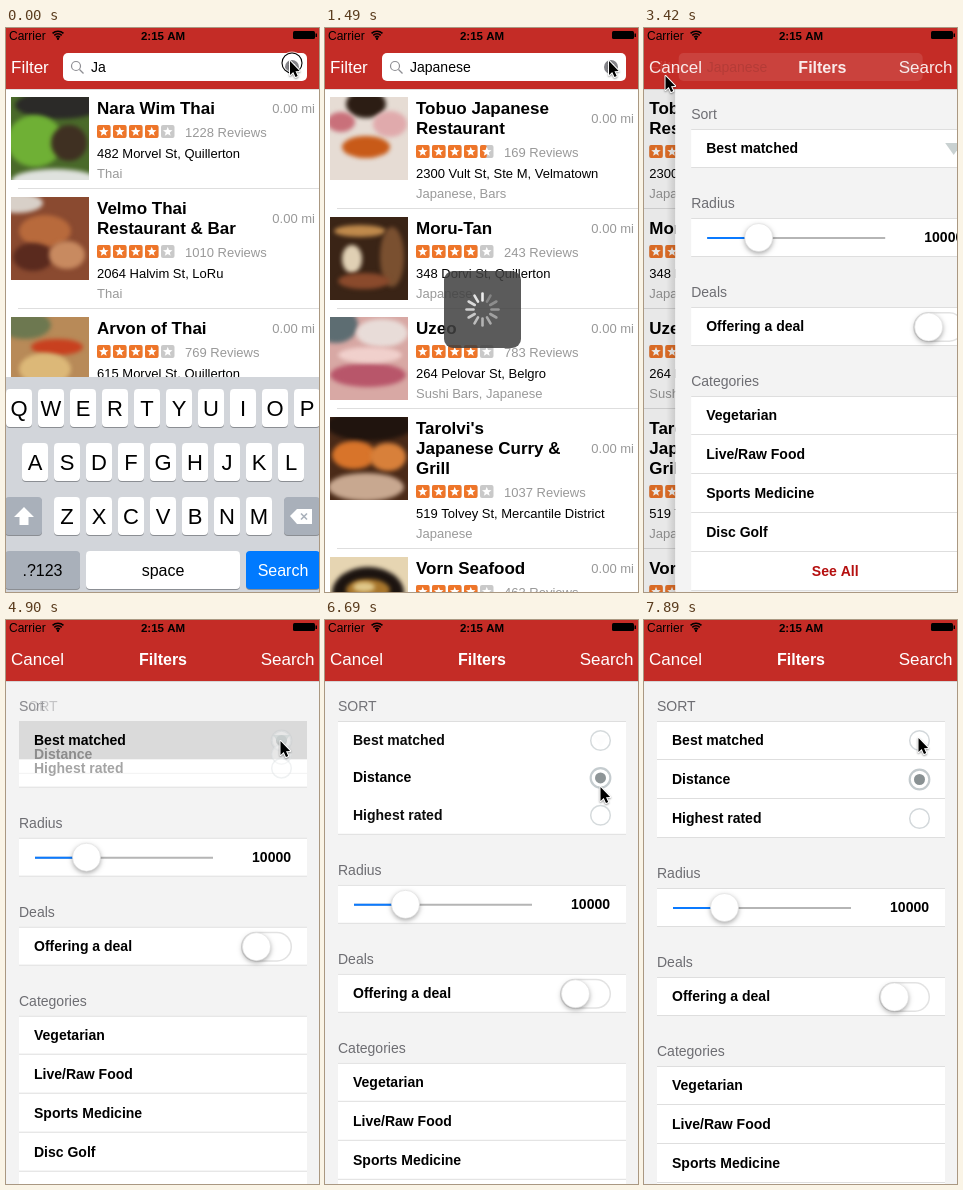
An HTML page with a canvas for the animation above (8000 ms loop, 313 by 564 pixels).

```html
<!DOCTYPE html>
<html lang="en">
<head>
<meta charset="utf-8">
<title>Search and filters</title>
<style>
html, body { margin: 0; width: 100%; height: 100%; overflow: hidden; background: #fff; }
canvas { display: block; }
</style>
</head>
<body>
<canvas id="stage" width="313" height="564"></canvas>
<script>
const ctx = document.getElementById('stage').getContext('2d');
const W = 313, H = 564, LOOP = 8000, STEP = 148.9;
const RED = '#c42c26', GREY = '#999', LINE = '#dedede', PANEL = '#f3f3f3';

const clamp = v => Math.max(0, Math.min(1, v));
const smooth = v => { v = clamp(v); return v * v * (3 - 2 * v); };

function text(str, x, midY, size, color = '#000', weight = '', align = 'left') {
  ctx.font = `${weight} ${size}px "Liberation Sans", Arial, sans-serif`;
  ctx.textAlign = align;
  ctx.fillStyle = color;
  ctx.fillText(str, x, Math.round(midY + size * 0.36));
}
function rect(x, y, w, h, color, r = 0) {
  ctx.fillStyle = color;
  ctx.beginPath();
  ctx.roundRect(x, y, w, h, r);
  ctx.fill();
}
function disc(x, y, rx, color, ry = rx) {
  ctx.fillStyle = color;
  ctx.beginPath();
  ctx.ellipse(x, y, rx, ry, 0, 0, 7);
  ctx.fill();
}
function ring(x, y, r, color, width) {
  ctx.strokeStyle = color;
  ctx.lineWidth = width;
  ctx.beginPath();
  ctx.arc(x, y, r, 0, 7);
  ctx.stroke();
}
function poly(points, color) {
  ctx.fillStyle = color;
  ctx.beginPath();
  points.forEach(p => ctx.lineTo(...p));
  ctx.closePath();
  ctx.fill();
}
function line(x1, y1, x2, y2, color, width = 1) {
  ctx.strokeStyle = color;
  ctx.lineWidth = width;
  ctx.beginPath();
  ctx.moveTo(x1, y1);
  ctx.lineTo(x2, y2);
  ctx.stroke();
}
function faded(alpha, draw, dx = 0, dy = 0) {
  if (alpha <= 0) return;
  ctx.save();
  ctx.globalAlpha *= alpha;
  ctx.translate(dx, dy);
  draw();
  ctx.restore();
}
function shadowed(blur, dy, draw) {
  ctx.save();
  ctx.shadowColor = 'rgba(0,0,0,.35)';
  ctx.shadowBlur = blur;
  ctx.shadowOffsetY = dy;
  draw();
  ctx.restore();
}

// Each photo: background, then soft ellipses [color, x, y, rx, ry].
const photos = {
  salad: ['#4a6a2a', ['#2b2a28', 48, 8, 44, 14], ['#6fb035', 24, 44, 28, 26], ['#3f3022', 58, 46, 18, 18], ['#dfe2de', 44, 84, 44, 12]],
  stirFry: ['#8a4a30', ['#d8d0c8', 6, 6, 26, 10], ['#b86a3c', 34, 34, 26, 16], ['#5a2a1e', 22, 60, 20, 14], ['#c88a60', 56, 58, 18, 14]],
  noodles: ['#b88a58', ['#6d7850', 14, 8, 26, 14], ['#c8401f', 46, 30, 26, 8], ['#dcb878', 34, 52, 26, 16], ['#e2d8c8', 8, 78, 26, 10]],
  sashimi: ['#e6dcd4', ['#2c1d14', 36, 7, 20, 14], ['#c9707a', 11, 25, 14, 10], ['#e0aaac', 60, 27, 17, 13], ['#c85a18', 36, 50, 24, 11]],
  interior: ['#3a2416', ['#c08a4c', 30, 14, 26, 6], ['#e0d0b4', 22, 42, 10, 14], ['#7a5030', 62, 40, 12, 30], ['#8a4a2c', 34, 64, 26, 8]],
  tuna: ['#d8a8a4', ['#5d6d72', 6, 8, 22, 18], ['#e8dcd8', 52, 16, 26, 14], ['#b8566a', 38, 58, 38, 12], ['#f0d0cc', 40, 38, 32, 8]],
  rolls: ['#4a2a18', ['#20140e', 40, 8, 44, 16], ['#d8742a', 24, 38, 22, 14], ['#d8803a', 58, 40, 18, 14], ['#c8a890', 36, 70, 38, 14]],
  bowl: ['#e6d5b2', ['#1c1410', 38, 36, 36, 26], ['#a8762c', 38, 33, 22, 11], ['#e0c88a', 34, 30, 11, 5]]
};

// [title lines, stars, reviews, address, category, photo]
const thaiPlaces = [
  [['Nara Wim Thai'], 4, 1228, '482 Morvel St, Quillerton', 'Thai', 'salad'],
  [['Velmo Thai', 'Restaurant & Bar'], 4, 1010, '2064 Halvim St, LoRu', 'Thai', 'stirFry'],
  [['Arvon of Thai'], 4, 769, '615 Morvel St, Quillerton', 'Thai', 'noodles'],
  [['Sovu Thai Kitchen'], 4, 541, '823 Dorvi St, Quillerton', 'Thai', 'stirFry'],
  [['Pimlao Noodle'], 4, 388, '276 Tolvey St, LoRu', 'Thai', 'noodles']
];
const japanesePlaces = [
  [['Tobuo Japanese', 'Restaurant'], 4.5, 169, '2300 Vult St, Ste M, Velmatown', 'Japanese, Bars', 'sashimi'],
  [['Moru-Tan'], 4, 243, '348 Dorvi St, Quillerton', 'Japanese', 'interior'],
  [['Uzeo'], 4, 783, '264 Pelovar St, Belgro', 'Sushi Bars, Japanese', 'tuna'],
  [["Tarolvi's", 'Japanese Curry &', 'Grill'], 4, 1037, '519 Tolvey St, Mercantile District', 'Japanese', 'rolls'],
  [['Vorn Seafood'], 4, 463, '731 Halvim St, Velmatown', 'Japanese', 'bowl']
];

function photo(name, x, y) {
  const [base, ...blobs] = photos[name];
  ctx.save();
  ctx.beginPath();
  ctx.rect(x, y, 78, 83);
  ctx.clip();
  ctx.translate(x, y);
  rect(0, 0, 78, 83, base);
  ctx.filter = 'blur(2px)';
  for (const [color, cx, cy, rx, ry] of blobs) disc(cx, cy, rx, color, ry);
  ctx.restore();
}

function stars(count, x, midY) {
  for (let i = 0; i < 5; i++) {
    const left = x + i * 16, share = clamp(count - i);
    rect(left, midY - 6.5, 13.5, 13, '#c9c9c9', 2);
    if (share) rect(left, midY - 6.5, 13.5 * share, 13, '#ee7529', 2);
    poly(Array.from({ length: 10 }, (_, n) => {
      const r = n % 2 ? 2.1 : 5, a = n * Math.PI / 5;
      return [left + 6.75 + r * Math.sin(a), midY + 0.3 - r * Math.cos(a)];
    }), '#fff');
  }
}

function list(places) {
  rect(-3, 61, 325, H, '#fff');
  let top = 61;
  for (const [title, rating, reviews, address, category, picture] of places) {
    const n = title.length, y = top + 20 * n;
    photo(picture, 5, top + 8);
    title.forEach((s, i) => text(s, 91, top + 19 + 20 * i, 17, '#000', 'bold'));
    text('0.00 mi', 309, top + 9 + 10 * n, 13, GREY, '', 'right');
    stars(rating, 91, y + 22.5);
    text(reviews + ' Reviews', 179, y + 23.5, 13, GREY);
    text(address, 91, y + 44, 13);
    text(category, 91, y + 64, 13, GREY);
    top = y + 80;
    line(12, top - 0.5, 320, top - 0.5, LINE);
  }
}

function keyboard() {
  rect(0, 349, W, 220, '#d2d5da');
  const key = (x, y, w, color, label, size, ink = '#000') => {
    rect(x, y + 1, w, 38, '#8b8e93', 4);
    rect(x, y, w, 38, color, 4);
    text(label, x + w / 2, y + 19, size, ink, '', 'center');
  };
  [['QWERTYUIOP', 0], ['ASDFGHJKL', 16], ['ZXCVBNM', 48]].forEach(([letters, x], row) =>
    [...letters].forEach((c, i) => key(x + 32 * i, 361 + 54 * row, 26, '#fff', c, 22)));
  key(-1, 469, 37, '#a9b0ba', '', 16);
  poly([[18, 479], [28, 489], [22.5, 489], [22.5, 497], [13.5, 497], [13.5, 489], [8, 489]], '#fff');
  key(278, 469, 36, '#a9b0ba', '', 16);
  poly([[284, 488], [291, 481], [306, 481], [306, 496], [291, 496]], '#fff');
  cross(298, 488.5, 3, '#a9b0ba');
  key(-1, 523, 75, '#a9b0ba', '.?123', 16);
  key(80, 523, 154, '#fff', 'space', 16);
  key(240, 523, 74, '#007aff', 'Search', 16, '#fff');
}

function cross(x, y, r, color) {
  line(x - r, y - r, x + r, y + r, color, 1.6);
  line(x - r, y + r, x + r, y - r, color, 1.6);
}

function searchField(query) {
  rect(57, 25, 244, 28, '#fff', 5);
  ring(70, 38, 4.5, '#8e8e93', 1.2);
  line(73.5, 41.5, 77.5, 45.5, '#8e8e93', 1.3);
  text(query, 85, 39, 14);
  disc(286, 39, 7, '#85858a');
  cross(286, 39, 2.8, '#fff');
}

function navBar(query, push, pressed) {
  rect(0, 0, W, 61, RED);
  text('Carrier', 3, 7.5, 12);
  for (const r of [3, 5.6, 8.2]) {
    ctx.strokeStyle = '#000';
    ctx.lineWidth = 1.6;
    ctx.beginPath();
    ctx.arc(52, 11.5, r, -2.3, -0.84);
    ctx.stroke();
  }
  disc(52, 10.7, 1.2, '#000');
  text('2:15 AM', 157, 7.5, 11.5, '#000', 'bold', 'center');
  rect(287, 3, 22, 8, '#000', 1.5);
  rect(309.5, 5.5, 1.5, 3.5, '#000');

  faded(1 - push, () => searchField(query), -25 * push);
  faded(pressed ? 0.25 : 1 - push, () => text('Filter', 5, 39, 17, '#fff'));
  faded(push, () => {
    text('Cancel', 5, 39, 17, '#fff');
    text('Search', 308.5, 39, 17, '#fff', '', 'right');
    text('Filters', 157 + 200 * (1 - push), 39, 16, '#fff', 'bold', 'center');
  });
}

function box(top, height) {
  rect(13, top, 288, height, '#fff');
  line(13, top + 0.5, 301, top + 0.5, LINE);
  line(13, top + height - 0.5, 301, top + height - 0.5, LINE);
}
const label = (str, y) => text(str, 28, y, 14, '#000', 'bold');
const heading = (str, y) => text(str, 13, y, 14, '#6d6d72');

function radio(y, on) {
  disc(275.5, y, 10, '#fff');
  ring(275.5, y, 9.8, on ? '#c3cacd' : '#d3d8db', on ? 2.2 : 1.5);
  if (on) disc(275.5, y, 5.5, '#899193');
}
function knob(x, y) {
  shadowed(5, 2, () => disc(x, y, 14, '#fff'));
  ring(x, y, 14, '#dedede', 0.6);
}

function filters({ open, collapsing, selected, highlight }) {
  rect(-3, 61, 325, H, PANEL);
  faded(1 - open, () => heading('Sort', 86));
  faded(open, () => heading('SORT', 86));
  box(101, 39 + 78 * open);
  const rowTop = i => 101 + 39 * i * open;
  if (highlight) rect(13, rowTop(selected), 288, 38, '#dadada');
  ['Best matched', 'Distance', 'Highest rated'].forEach((name, i) => {
    const y = rowTop(i) + 19;
    faded(i === selected ? 1 : open, () => label(name, y));
    faded(open, () => {
      radio(y + 0.5, i === selected);
      if (!collapsing && i < 2) line(13, y + 19.5, 301, y + 19.5, LINE);
    });
  });
  faded(1 - open, () => poly([[267, 115], [284, 115], [275.5, 127]], '#c9d1d1'));

  ctx.save();
  ctx.translate(0, 78 * open);
  heading('Radius', 175);
  box(190, 39);
  line(29, 210, 207, 210, '#b5b5b5', 2);
  line(29, 210, 80, 210, '#0a7aff', 2);
  knob(80.5, 209.5);
  text('10000', 285, 209, 14, '#000', 'bold', 'right');

  heading('Deals', 264);
  box(279, 39);
  label('Offering a deal', 298);
  rect(235, 284, 51, 30, '#e2e2e2', 15);
  rect(236.5, 285.5, 48, 27, '#fff', 13.5);
  knob(250.5, 299);

  heading('Categories', 353);
  box(368, 195);
  ['Vegetarian', 'Live/Raw Food', 'Sports Medicine', 'Disc Golf'].forEach((name, i) => {
    label(name, 387 + 39 * i);
    line(13, 406.5 + 39 * i, 301, 406.5 + 39 * i, LINE);
  });
  text('See All', 157, 543, 14, '#b50f0f', 'bold', 'center');
  ctx.restore();
}

function hud(time) {
  rect(119, 243, 77, 77, 'rgba(64,64,64,.86)', 9);
  const phase = Math.floor(time / 83) + 5;
  ctx.lineCap = 'round';
  for (let i = 0; i < 12; i++) {
    const a = i * Math.PI / 6, c = Math.cos(a), s = Math.sin(a);
    const alpha = 0.25 + 0.7 * ((i - phase % 12 + 12) % 12) / 12;
    line(157.5 + 9 * c, 281.5 + 9 * s, 157.5 + 16 * c, 281.5 + 16 * s, `rgba(255,255,255,${alpha})`, 2.6);
  }
  ctx.lineCap = 'butt';
}

// Pointer stops: [step, x, y]
const stops = [[0, 284, 33], [16, 284, 33], [20, 21.5, 48], [24, 21.5, 48], [30, 274.5, 121], [37, 274.5, 121],
  [40, 275.5, 167], [46, 275.5, 167], [49, 274.5, 118], [54, 274.5, 118]];
const tapSteps = [0, 20, 21, 31, 32, 41, 50];

function pointer(step) {
  const next = stops.findIndex(s => s[0] > step);
  const [k0, x0, y0] = stops[next - 1], [k1, x1, y1] = stops[next];
  const f = smooth((step - k0) / (k1 - k0));
  ctx.save();
  ctx.translate(x0 + (x1 - x0) * f, y0 + (y1 - y0) * f);
  if (tapSteps.includes(step)) {
    ring(2, 2, 10, 'rgba(255,255,255,.7)', 3);
    ring(2, 2, 10, '#000', 1.1);
  }
  ctx.lineJoin = 'round';
  ctx.strokeStyle = '#fff';
  ctx.lineWidth = 2;
  const arrow = [[0, 0], [0, 14], [3.2, 11], [5.5, 16], [7.7, 15], [5.5, 10.2], [9.6, 10]];
  shadowed(2, 1, () => {
    poly(arrow, '#000');
    ctx.stroke();
  });
  poly(arrow, '#000');
  ctx.restore();
}

function draw(now) {
  const step = Math.floor((now % LOOP + 15) / STEP), time = step * STEP;
  const typed = [2, 3, 4, 4, 5, 6][step] || 8;
  const push = 1 - (1 - clamp((time - 3162) / 500)) ** 3;
  const firstOpen = 4793, close = 6664, reopen = 7473;
  const opening = start => smooth((time - start) / 300);
  const near = start => time > start - 180 && time < start + 200;

  ctx.clearRect(0, 0, W, H);
  if (push < 1) {
    faded(1, () => list(step < 10 ? thaiPlaces : japanesePlaces), -96 * push);
    faded(clamp(Math.min((time - 1150) / 150, (2050 - time) / 200)), () => hud(time));
    const keyboardDrop = smooth((time - 1100) / 250);
    if (keyboardDrop < 1) faded(1, keyboard, 0, 215 * keyboardDrop);
  }
  if (push > 0) {
    rect(0, 61, W, H, `rgba(0,0,0,${0.1 * push})`);
    const left = 320 * (1 - push);
    if (push < 1) {
      const shade = ctx.createLinearGradient(left - 12, 0, left - 3, 0);
      shade.addColorStop(0, 'rgba(0,0,0,0)');
      shade.addColorStop(1, 'rgba(0,0,0,.12)');
      rect(left - 12, 61, 9, H, shade);
    }
    faded(1, () => filters({
      open: opening(firstOpen) - opening(close) + opening(reopen),
      collapsing: time > close && time < reopen,
      selected: step < 41 ? 0 : 1,
      highlight: near(firstOpen) || near(reopen)
    }), left);
  }
  navBar('Japanese'.slice(0, typed), push, step === 21);
  rect(0, 61, W, 1, 'rgba(0,0,0,.12)');
  pointer(step);
}

function tick() {
  draw(performance.now());
  requestAnimationFrame(tick);
}
tick();
</script>
</body>
</html>
```
